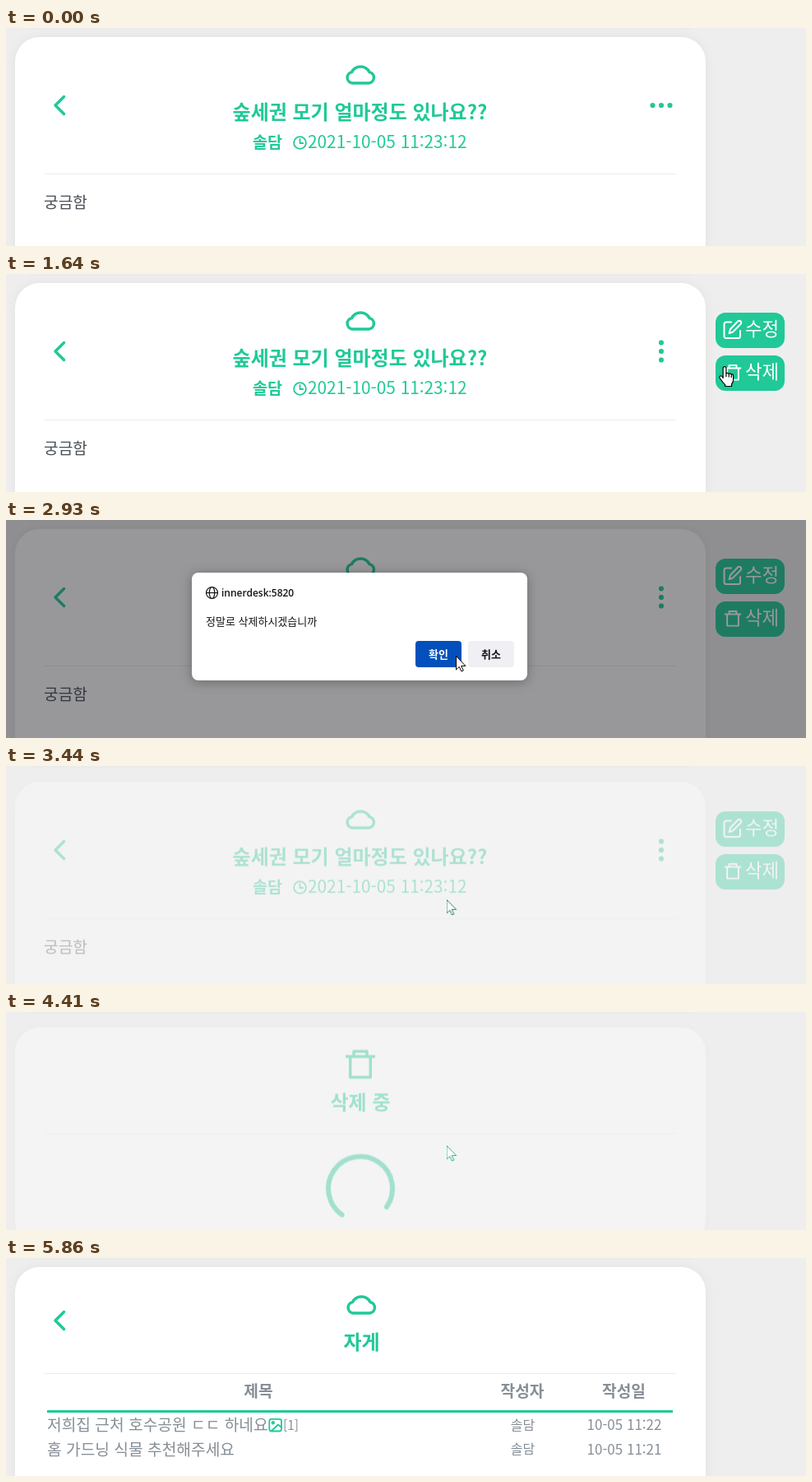
These frames come from a looping animation (973 by 265 pixels, 6260 ms). An HTML page:

```html
<!DOCTYPE html>
<html lang="ko">
<head>
<meta charset="utf-8">
<title>게시글 삭제</title>
<style>
  html, body { margin: 0; width: 100%; height: 100%; overflow: hidden; background: #eee; }
  svg { display: block; width: 973px; height: 265px; --green: #20c997; --gray: #868e96; }
  text { font-family: "Noto Sans CJK KR", "Noto Sans KR", "Noto Sans CJK", sans-serif; }

  .card { fill: #fff; filter: drop-shadow(0 0 6px rgba(0, 0, 0, .05)); }
  .rule { fill: #e9ecef; }
  .icon { fill: none; stroke: var(--green); stroke-width: 3.5; stroke-linecap: round; stroke-linejoin: round; }
  .sharp { stroke-linecap: butt; }
  .thin { stroke-width: 1.8; }
  .green { fill: var(--green); }
  .title { font-size: 24px; font-weight: 700; fill: var(--green); text-anchor: middle; }
  .stamp { font-size: 20.8px; font-weight: 300; fill: var(--green); }
  .name { font-size: 19.6px; font-weight: 700; fill: var(--green); }
  .body { font-size: 19.2px; font-weight: 300; fill: #495057; }
  .head { font-size: 19.2px; font-weight: 700; fill: var(--gray); text-anchor: middle; }
  .post { font-size: 19.2px; font-weight: 300; fill: var(--gray); }
  .cell { font-size: 17px; font-weight: 300; fill: var(--gray); text-anchor: middle; }
  .user { font-size: 16px; }
  .menu text { font-size: 22.4px; font-weight: 300; fill: #fff; }
  .menu .icon { stroke: #fff; }
  .box { fill: #fff; filter: drop-shadow(0 2px 7px rgba(0, 0, 0, .3)); }
  .host { font: 600 12px "Open Sans", "Noto Sans", sans-serif; fill: #15141a; }
  .ask { font-size: 13px; fill: #15141a; }
  .btn { font-size: 13px; font-weight: 700; fill: #15141a; text-anchor: middle; }

  .anim { animation: 6260ms linear infinite both; }
  .view { animation-name: view; }
  .wait { animation-name: wait; }
  .list { animation-name: list; }
  .dots { animation-name: dots; animation-timing-function: ease; }
  .menu { animation-name: menu; }
  .dim { animation-name: dim; }
  .dialog { animation-name: dialog; }
  .ok { animation-name: ok; animation-timing-function: step-end; }
  .spin { animation-name: spin; }
  .row1 { animation-name: row1; }
  .row2 { animation-name: row2; }
  .cursor { animation-name: move; }
  .hand { animation-name: hand; animation-timing-function: step-end; }
  .arrow { animation-name: arrow, tint; animation-duration: 6260ms; animation-timing-function: step-end; }

  /* pages fade while sliding 12px */
  @keyframes view {
    0%, 51.92% { opacity: 1; transform: translateY(0); }
    56.39%, 100% { opacity: 0; transform: translateY(12px); }
  }
  @keyframes wait {
    0%, 56.55% { opacity: 0; transform: translateY(12px); }
    61.34%, 67.5% { opacity: 1; transform: translateY(0); }
    72.2%, 100% { opacity: 0; transform: translateY(12px); }
  }
  @keyframes list {
    0%, 72.36% { opacity: 0; transform: translateY(12px); }
    76.68%, 78.27% { opacity: .92; transform: translateY(1px); }
    78.59%, 100% { opacity: 1; transform: translateY(0); }
  }
  @keyframes dots {
    0%, 15.34% { transform: rotate(0deg); }
    19.33%, 100% { transform: rotate(90deg); }
  }
  @keyframes menu {
    0%, 15.34% { opacity: 0; }
    19.33%, 100% { opacity: 1; }
  }
  @keyframes dim {
    0%, 29.55% { opacity: 0; }
    31.95%, 48.72% { opacity: 1; }
    48.73%, 100% { opacity: 0; }
  }
  @keyframes dialog {
    0%, 30.2% { opacity: 0; }
    31.95%, 48.72% { opacity: 1; }
    48.73%, 100% { opacity: 0; }
  }
  @keyframes ok {
    0% { fill: #0061e0; }
    45%, 100% { fill: #0250bb; }
  }
  @keyframes spin {
    from { transform: rotate(43deg); }
    to { transform: rotate(2203deg); }
  }
  @keyframes row1 {
    0%, 75% { fill: var(--gray); }
    76.2%, 78.27% { fill: #58aa98; }
    81.5%, 100% { fill: var(--gray); }
  }
  @keyframes row2 {
    0%, 78.27% { fill: var(--gray); }
    81.5%, 90.5% { fill: var(--green); }
    93.4%, 100% { fill: var(--gray); }
  }
  @keyframes move {
    0%, 4.95% { transform: translate(908px, 268px); }
    8% { transform: translate(872px, 194px); }
    11.2% { transform: translate(818px, 118px); animation-timing-function: ease-out; }
    14.7%, 19.8% { transform: translate(797px, 94px); animation-timing-function: ease-in-out; }
    24.92%, 26.5% { transform: translate(874px, 112px); }
    28.75%, 36.1% { transform: translate(897px, 121px); animation-timing-function: ease-in-out; }
    45.85% { transform: translate(550px, 165px); }
    46.81%, 49% { transform: translate(547px, 165px); }
    51.5%, 72.5% { transform: translate(535.5px, 162px); animation-timing-function: ease-in-out; }
    76.6%, 78.27% { transform: translate(660px, 226px); }
    83%, 89.3% { transform: translate(667px, 237px); }
    90.4% { transform: translate(700px, 244px); }
    91.6% { transform: translate(790px, 255px); }
    92.8% { transform: translate(891px, 266px); }
    93.3%, 100% { transform: translate(915px, 280px); }
  }
  @keyframes hand {
    0% { opacity: 0; }
    12.9% { opacity: 1; }
    21% { opacity: 0; }
    23.2% { opacity: 1; }
    29.55% { opacity: 0; }
    75% { opacity: 1; }
    91%, 100% { opacity: 0; }
  }
  @keyframes arrow {
    0% { opacity: 1; }
    12.9% { opacity: 0; }
    21% { opacity: 1; }
    23.2% { opacity: 0; }
    29.55% { opacity: 1; }
    75% { opacity: 0; }
    91%, 100% { opacity: 1; }
  }
  @keyframes tint {
    0% { stroke: #000; }
    51.92% { stroke: #1c8068; }
    58% { stroke: #20b48a; }
    72.4%, 100% { stroke: #000; }
  }
</style>
</head>
<body>
<svg viewBox="0 0 973 265" width="973" height="265">
  <defs>
    <path id="cloud" d="M421 67H441.5A6.8 6.8 0 0 0 442 53.6A12 12 0 0 0 420.5 53.6A6.8 6.8 0 0 0 421 67Z"/>
    <path id="back" d="M70.5 83.5L60 94L70.5 104.5"/>
    <path id="trash" d="M-18 0H18M-8 0V-6.3H8V0M-12.3 0V25.2H12.3V0"/>
  </defs>
  <rect width="973" height="265" fill="#eee"/>
  <rect x="27" width="808" height="2" fill="#ebebeb"/>

  <g class="anim view">
    <rect class="card" x="11" y="11" width="840" height="320" rx="30"/>
    <use href="#cloud" class="icon"/>
    <use href="#back" class="icon"/>
    <g transform="translate(797 94)">
      <g class="anim dots green">
        <circle cx="-10.5" r="3.1"/><circle r="3.1"/><circle cx="10.5" r="3.1"/>
      </g>
    </g>
    <text class="title" x="430.5" y="111">숲세권 모기 얼마정도 있나요??</text>
    <text class="name" x="300" y="146">솔담</text>
    <g class="icon thin"><circle cx="357.5" cy="139.5" r="7.4"/><path d="M357.5 135V140H361.2"/></g>
    <text class="stamp" x="367" y="146">2021-10-05 11:23:12</text>
    <rect class="rule" x="47" y="177" width="768" height="1"/>
    <text class="body" x="46" y="219">궁금함</text>

    <g class="anim menu">
      <rect class="green" x="863" y="47" width="84" height="43" rx="12"/>
      <rect class="green" x="863" y="99" width="84" height="43" rx="12"/>
      <path class="icon" style="stroke-width:2" d="M882 58.5H876Q873.5 58.5 873.5 61V75.500Q873.500 78 876 78H890.500Q893 78 893 75.500V69M890 57.500a2.300 2.300 0 0 1 3.500 3.500L884 70.500L879.500 72L881 67Z"/>
      <text x="899" y="75">수정</text>
      <use href="#trash" class="icon sharp" transform="translate(884 114.500) scale(.56)"/>
      <text x="899" y="127">삭제</text>
    </g>
  </g>

  <g class="anim wait">
    <rect class="card" x="11" y="11" width="840" height="264" rx="30"/>
    <use href="#trash" class="icon sharp" transform="translate(431 46.500)"/>
    <text class="title" x="431" y="111">삭제 중</text>
    <rect class="rule" x="47" y="140" width="768" height="1"/>
    <g transform="translate(431 207)">
      <circle class="anim spin icon" style="stroke-width:6" r="39" pathLength="4" stroke-dasharray="3 1"/>
    </g>
  </g>

  <g class="anim list">
    <rect class="card" x="11" y="11" width="840" height="320" rx="30"/>
    <use href="#cloud" class="icon" x="1"/>
    <use href="#back" class="icon" y="-18"/>
    <text class="title" x="432.5" y="111">자게</text>
    <rect class="rule" x="47" y="140" width="768" height="1"/>
    <text class="head" x="307" y="169">제목</text>
    <text class="head" x="628" y="169">작성자</text>
    <text class="head" x="751.5" y="169">작성일</text>
    <rect class="green" x="50" y="185" width="761" height="3"/>
    <text class="post anim row1" x="50" y="210">저희집 근처 호수공원 ㄷㄷ 하네요</text>
    <g class="icon thin">
      <rect x="320.300" y="195.800" width="14.700" height="14.700" rx="2.500"/>
      <circle cx="324.800" cy="200.300" r="1.300"/>
      <path d="M323 210L331 202.500L335 206"/>
    </g>
    <text class="post anim row1" style="font-size:15.400px" x="337" y="209">[1]</text>
    <text class="cell user" x="628.500" y="209">솔담</text>
    <text class="cell" x="752" y="209">10-05 11:22</text>
    <text class="post anim row2" x="50" y="240">홈 가드닝 식물 추천해주세요</text>
    <text class="cell user" x="628.500" y="238">솔담</text>
    <text class="cell" x="752" y="238.500">10-05 11:21</text>
  </g>

  <rect class="anim dim" width="973" height="265" fill="#1c1b22" fill-opacity=".45"/>
  <g class="anim dialog">
    <rect class="box" x="226" y="64" width="408" height="131" rx="8"/>
    <g fill="none" stroke="#15141a" stroke-width="1.200">
      <circle cx="250.500" cy="88.500" r="7"/>
      <ellipse cx="250.500" cy="88.500" rx="3.200" ry="7"/>
      <path d="M243.500 88.500H257.500"/>
    </g>
    <text class="host" x="262" y="93">innerdesk:5820</text>
    <text class="ask" x="243" y="128">정말로 삭제하시겠습니까</text>
    <rect class="anim ok" x="498" y="147" width="56" height="32" rx="4"/>
    <text class="btn" style="fill:#fff" x="526" y="168">확인</text>
    <rect x="562" y="147" width="56" height="32" rx="4" fill="#f0f0f4"/>
    <text class="btn" x="590" y="168">취소</text>
  </g>

  <g class="anim cursor" fill="#fff" stroke="#000" stroke-linejoin="round">
    <path class="anim arrow" d="M.5 .5V17L4.300 13.400L7 19L9.300 18L6.700 12.400H12Z"/>
    <g class="anim hand">
      <path stroke-width="1.200" transform="translate(-6.900 .500)" d="M5 14V2a1.900 1.900 0 0 1 3.800 0V8.500Q10.600 7.100 12.100 8.900Q14.100 7.900 15.100 9.500Q17.500 8.900 17.500 11.300V16Q17.500 19 15.500 21.200V24H7.500V22.200Q4 18.500 1 14Q.3 12 2 11.300Q3.500 11 5 14ZM8.800 8.500V12.500M12.100 9V13M15.100 9.600V13.500"/>
    </g>
  </g>
</svg>
</body>
</html>
```
